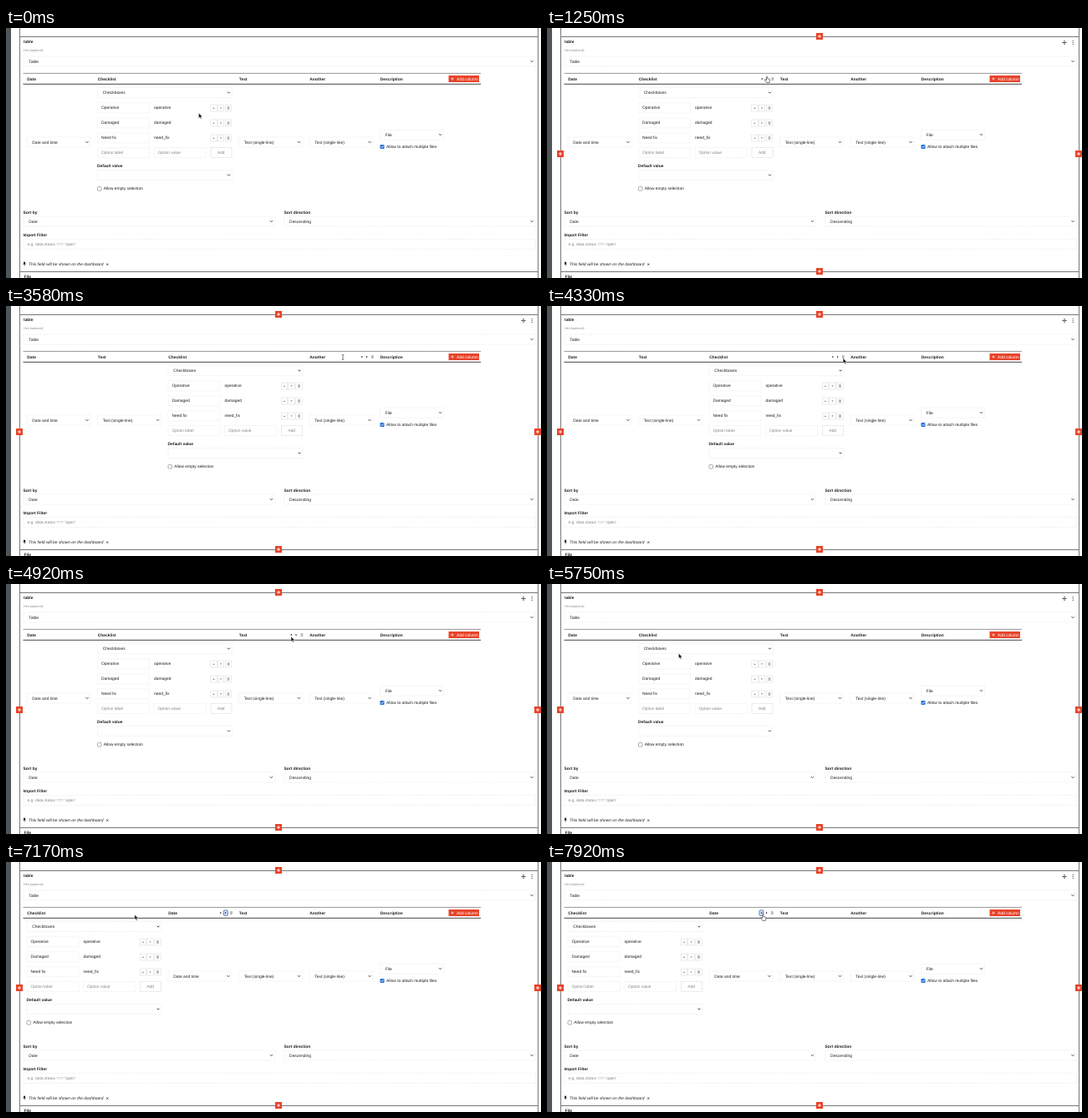
An HTML page for the animation above (8000 ms loop, 640x300 px).

```html
<!DOCTYPE html>
<html lang="en">
<head>
<meta charset="utf-8">
<title>Table columns</title>
<style>
html, body { margin: 0; width: 100%; height: 100%; overflow: hidden; background: #fff; }
svg { display: block; width: 640px; height: 300px; }
text { font: 4.9px "Liberation Sans", Arial, sans-serif; fill: #1c1c1c; text-rendering: geometricPrecision; white-space: pre; }
.b { font-weight: 700; }
.i { font-style: italic; }
.g { fill: #858585; }
.h { fill: #888; font-size: 3.8px; }
.w { fill: #fff; }
.box { fill: #fff; stroke: #e6e6e6; stroke-width: .7; stroke-dasharray: 1 1; }
.btn { fill: #fff; stroke: #dedede; stroke-width: .6; }
.line { fill: none; stroke: #777; }
.rule { fill: none; stroke: #444; }
</style>
</head>
<body>
<svg id="stage" viewBox="0 0 640 300"></svg>
<script>
const RED = '#e8432a';
const LOOP = 8000, TICK = 1000 / 12;

// Drawing helpers; text and widgets are placed by their vertical centre.
const text = (x, y, s, cls = '') => `<text x="${x}" y="${y + 1.5}" class="${cls}">${s}</text>`;
const rect = (x, y, w, h, attrs) => `<rect x="${x}" y="${y}" width="${w}" height="${h}" ${attrs}/>`;
const path = (d, attrs) => `<path d="${d}" ${attrs}/>`;
const group = (id, s) => `<g id="${id}">${s}</g>`;
const input = (x, y, w, s, cls = '') => rect(x, y - 6, w, 12, 'class="box"') + text(x + 4.5, y, s, cls);
const chevron = (x, y) => path(`M${x - 1.5} ${y - .8}l1.5 1.5l1.5-1.5`, 'fill="none" stroke="#222" stroke-width=".85"');
const select = (x, y, w, s) => rect(x, y - 6, w, 12, 'class="box"') + text(x + 6.3, y, s) + chevron(x + w - 4, y);
const trash = (x, y) => path(`M${x - 1.3} ${y - 1.5}h2.6M${x - .9} ${y - 1}v2.6h1.8v-2.6M${x} ${y - 1}v2.2`,
  'fill="none" stroke="#777" stroke-width=".5"');
const plus = (x, y, r, width) => path(`M${x - r} ${y}h${2 * r}M${x} ${y - r}v${2 * r}`,
  `fill="none" stroke="#fff" stroke-width="${width}"`);
const adder = (x, y) => rect(x - 4, y - 4, 8, 8, `fill="${RED}"`) + plus(x, y, 2, .9);

function checkbox(x, y, label, checked) {
  const box = checked
    ? rect(x, y - 2.5, 5, 5, 'rx=".8" fill="#2470d8"') +
      path(`M${x + 1.1} ${y}l1.1 1.2l1.8-2.5`, 'fill="none" stroke="#fff" stroke-width=".8"')
    : rect(x + .3, y - 2.2, 4.5, 4.5, 'rx=".7" fill="#fff" stroke="#777" stroke-width=".6"');
  return box + text(x + 7.6, y, label);
}

function option(y, label, value) {
  const button = x => rect(x - 3.7, y - 4, 7.4, 8, 'class="btn"');
  return input(0, y - .2, 62, label) + text(67.5, y - .3, value) +
    button(139) + button(147.5) + button(156.5) +
    path(`M137.9 ${y + .7}l1.1-1.3l1.1 1.3zM146.4 ${y - .6}l1.1 1.3l1.1-1.3z`, 'fill="#555"') + trash(156.5, y);
}

const checklist = select(0, 77.5, 161, 'Checkboxes') +
  option(96, 'Operative', 'operative') + option(114, 'Damaged', 'damaged') + option(132, 'Need fix', 'need_fix') +
  input(0, 149.5, 62, 'Option label', 'g') + input(67.5, 149.5, 62, 'Option value', 'g') +
  rect(135.5, 143.5, 25, 12, 'class="btn"') + text(143.4, 149.5, 'Add', 'g') +
  text(-.5, 165, 'Default value', 'b') + select(0, 176.5, 161, '') +
  checkbox(-.3, 192.8, 'Allow empty selection');

const columns = {
  D: { title: 'Date', width: 76, body: select(0, 137, 76, 'Date and time') },
  C: { title: 'Checklist', width: 161, body: checklist },
  T: { title: 'Text', width: 76, body: select(0, 137, 76, 'Text (single-line)') },
  A: { title: 'Another', width: 76, body: select(0, 137, 76, 'Text (single-line)') },
  E: { title: 'Description', width: 76,
    body: select(0, 128, 76, 'File') + checkbox(0, 142.5, 'Allow to attach multiple files', true) }
};

const tools = group('mark', rect(-2.5, 57.9, 5, 6.4, 'rx="1.2" fill="#d3e0f5" stroke="#4169ad" stroke-width=".8"')) +
  path('M-12.7 59.7v2.6l-1.6-1.3zM-8 59.7v2.6l1.6-1.3z', 'fill="#222"') + trash(-.6, 61);

const pointers =
  group('arrow', path('M0 0v6.2l1.4-1.3l1 2.2l1-.4l-1-2.1h2z', 'fill="#111" stroke="#fff" stroke-width=".4"')) +
  group('beam', path('M-1.3-3q1.3 0 1.3.6v4.8q0 .6-1.3.6M1.3-3q-1.3 0-1.3.6M0 2.4q0 .6 1.3.6',
    'fill="none" stroke="#333" stroke-width=".65"')) +
  group('hand', path('M-.8-2.6q.7-1 1.3 0v2.2l2.4.6q.8.3.6 1.3l-.6 2.8h-3.6l-2.2-3q-.2-1 .8-.7l1.3.9z',
    'fill="#fff" stroke="#222" stroke-width=".6"'));

const stage = document.getElementById('stage');
stage.innerHTML =
  rect(0, 0, 6, 300, 'fill="#4f5659"') +
  path('M16.5 0V300M636.5 0V300M16 10.5H637M16 292.5H637', 'class="line"') +
  text(21, 16.5, 'table', 'b') + text(21, 26.2, 'Hint (optional)', 'h') +
  select(21, 40, 612, 'Table') +
  path('M20.5 54.4H568', 'fill="none" stroke="#999"') + path('M20.5 67.3H568', 'class="rule"') +
  rect(529.5, 57, 36.5, 8, `fill="${RED}"`) + plus(534, 61, 1.6, .7) + text(539, 61, 'Add column', 'w') +
  Object.entries(columns).map(([key, c]) => group(key, c.body + text(.3, 61, c.title, 'b'))).join('') +
  group('tools', tools) +
  text(20.5, 221, 'Sort by', 'b') + select(21, 232, 300.5, 'Date') +
  text(332.5, 221, 'Sort direction', 'b') + select(332.8, 232, 300.2, 'Descending') +
  text(20.5, 248, 'Import Filter', 'b') + input(21, 259.5, 612, "e.g. data.status === 'open'", 'g') +
  path('M20.8 280.8h2.6l-.4.6v1.2l.9 1h-3.6l.9-1v-1.2zM21.8 283.4h.6v2h-.6z', 'fill="#111"') +
  text(27, 283, 'This field will be shown on the dashboard', 'i') +
  path('M120.3 282.6l2 2m0-2l-2 2', 'fill="none" stroke="#111" stroke-width=".8"') +
  text(21.5, 298.5, 'File', 'b') +
  group('hover', adder(326, 10) + adder(16, 151) + adder(636, 151) + adder(326, 292) +
    path('M616.8 17.5h4.4M619 15.3v4.4', 'fill="none" stroke="#333" stroke-width=".7"') +
    path('M618.2 15.8l.8-1.1l.8 1.1zM618.2 19.2l.8 1.1l.8-1.1zM617.3 16.7l-1.1.8l1.1.8zM620.7 16.7l1.1.8l-1.1.8z', 'fill="#333"') +
    [15.5, 17.5, 19.5].map(y => `<circle cx="629.2" cy="${y}" r=".6" fill="#222"/>`).join('')) +
  group('pointer', pointers);

const el = id => document.getElementById(id);
const move = (id, x, y = 0) => el(id).setAttribute('transform', `translate(${x} ${y})`);
const show = (id, on) => el(id).setAttribute('visibility', on ? 'inherit' : 'hidden');

// Pointer stops: time, x, y, shape from that moment on.
const stops = [
  [0, 230.5, 102, 'arrow'], [83, 235, 98, 'arrow'], [170, 235, 98, 'arrow'],
  [583, 175, 55, 'arrow'], [750, 175, 55, 'arrow'], [1160, 263, 61, 'hand'],
  [1670, 264.5, 62, 'hand'], [1750, 265, 63, 'hand'], [1920, 265, 63, 'hand'],
  [2000, 264.5, 60.7, 'beam'], [2340, 264.5, 60.7, 'beam'], [2417, 272, 70, 'arrow'],
  [2670, 330, 153, 'arrow'], [2830, 365, 140, 'arrow'], [3167, 423, 63, 'arrow'],
  [3420, 422, 62.5, 'arrow'], [3500, 422, 62.5, 'arrow'], [3583, 403, 61.5, 'beam'],
  [3750, 403, 61.5, 'beam'], [4000, 372, 62, 'arrow'], [4580, 341, 63, 'arrow'],
  [5170, 341, 63, 'arrow'], [5500, 250, 112, 'arrow'], [5917, 96, 64, 'arrow'],
  [6080, 94.5, 63.5, 'hand'], [6670, 94.5, 64, 'hand'], [6917, 120, 64, 'arrow'],
  [7500, 199, 62, 'beam'], [7583, 215, 62, 'beam'], [7750, 258, 63, 'arrow'],
  [7917, 258.5, 66, 'hand'], [8000, 258.5, 66, 'hand']
];

// Table states: time, column order, column with tools, marked tool.
const states = [
  [0, 'DCTAE'], [1080, 'DCTAE', 'C'], [1660, 'DCTAE', 'C', 'right'], [1990, 'DTCAE', 'C', 'right'],
  [2580, 'DTCAE'], [3080, 'DTCAE', 'A'], [4160, 'DTCAE', 'C'], [4740, 'DTCAE', 'C', 'left'],
  [4910, 'DCTAE', 'T'], [5320, 'DCTAE'], [5820, 'DCTAE', 'D'], [6410, 'DCTAE', 'D', 'right'],
  [6740, 'CDTAE', 'D', 'right'], [7740, 'CDTAE', 'D'], [7910, 'CDTAE', 'D', 'left']
];

function drawTable(t) {
  const [, order, active, mark] = states.findLast(s => s[0] <= t);
  let x = 25;
  for (const key of order) {
    const { width } = columns[key];
    move(key, x);
    if (key === active) move('tools', x + width);
    x += width + (key === 'C' ? 8 : 8.5);
  }
  show('tools', active);
  // The mark must not outlive its hidden parent, so it is hidden on its own.
  show('mark', mark);
  move('mark', mark === 'left' ? -13.5 : -7.2);
}

function drawPointer(t) {
  const k = Math.min(stops.findLastIndex(s => s[0] <= t), stops.length - 2);
  const [t0, x0, y0, shape] = stops[k], [t1, x1, y1] = stops[k + 1];
  const p = (t - t0) / (t1 - t0);
  move('pointer', x0 + (x1 - x0) * p, y0 + (y1 - y0) * p);
  for (const id of ['arrow', 'beam', 'hand']) show(id, id === shape);
}

const start = performance.now();
function frame() {
  const elapsed = (performance.now() - start) % LOOP;
  const t = Math.floor(elapsed / TICK + .05) * TICK + .5;
  drawTable(t);
  drawPointer(t);
  show('hover', t >= 830);
  requestAnimationFrame(frame);
}
frame();
</script>
</body>
</html>
```
